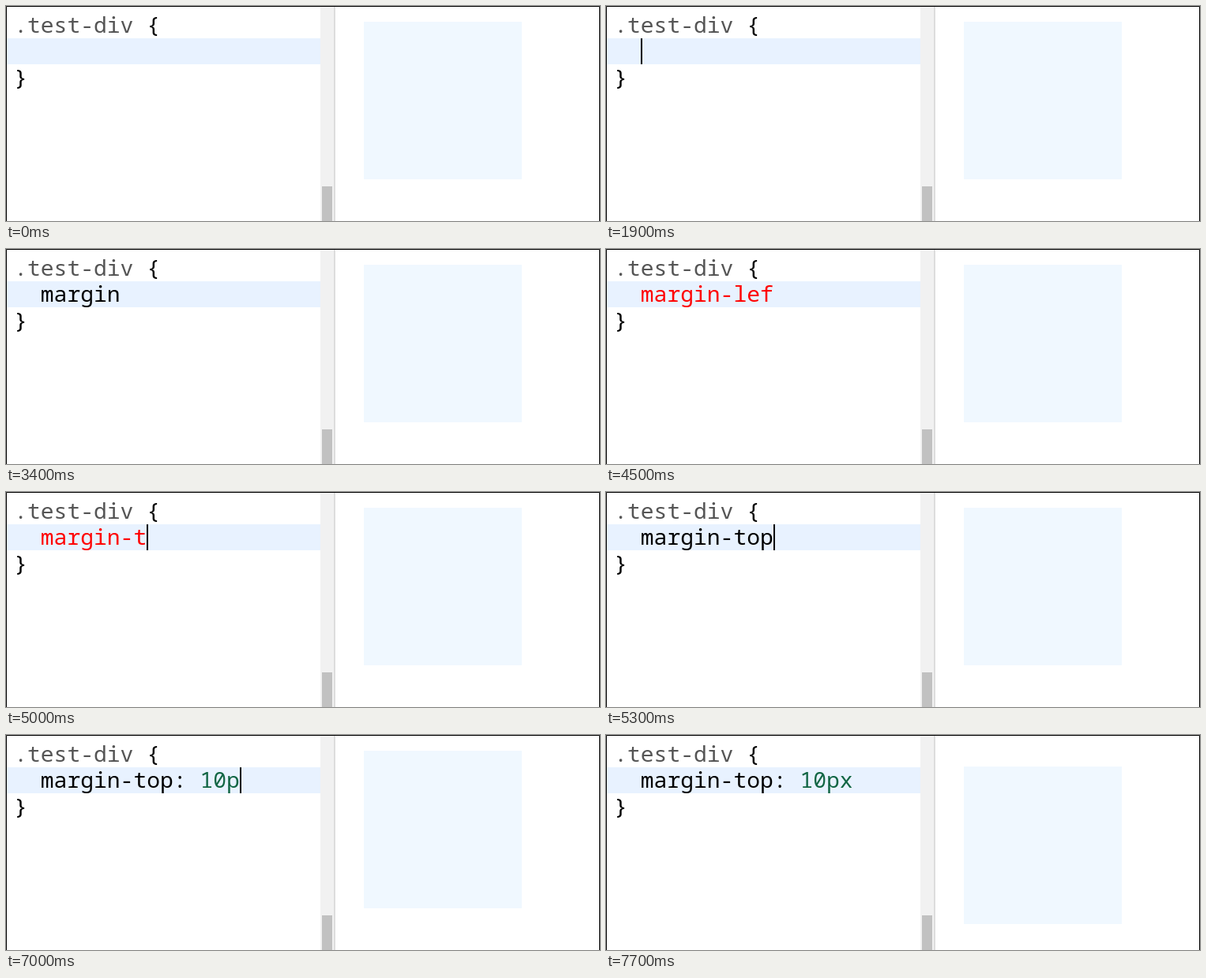
These frames come from a looping animation (752x273 px, 8000 ms). An HTML page:

```html
<!DOCTYPE html>
<html lang="en">
<head>
<meta charset="utf-8">
<title>Typing a CSS rule</title>
<style>
  html, body { margin: 0; width: 100%; height: 100%; overflow: hidden; background: #fff; }
  svg { display: block; width: 752px; height: 273px; }
  text { white-space: pre; font-kerning: none; font-variant-ligatures: none; }
  .selector { fill: #555; }
  .error { fill: #f00; }
  .value { fill: #164; }
</style>
</head>
<body>
<svg viewBox="0 0 752 273">
  <rect width="752" height="273" fill="#fff"/>
  <rect x="1" y="41" width="397" height="33" fill="#e8f2ff"/>
  <rect x="398" width="17" height="273" fill="#f1f1f1"/>
  <rect x="400" y="229" width="13" height="44" fill="#c1c1c1"/>
  <rect x="415" width="2" height="273" fill="#ddd"/>
  <rect id="box" x="453" y="20" width="200" height="200" fill="#f0f8ff"/>
  <g id="code">
    <text x="10.2" y="34"><tspan class="selector">.test-div</tspan> {</text>
    <text x="43.8" y="67"><tspan id="property"></tspan><tspan id="colon"></tspan><tspan id="value" class="value"></tspan></text>
    <text x="10.2" y="101">}</text>
  </g>
  <rect id="caret" y="41" width="2" height="33"/>
  <path d="M.5 273V.5H751.5V273" fill="none" stroke="#000"/>
</svg>
<script>
const LOOP = 8000, ADVANCE = 16.8, INDENT = 43.8, X_HEIGHT = 13.6;
const VALID = ['', 'margin', 'margin-top'];
const $ = id => document.getElementById(id);

// [start in ms, typed text, caret visible]
const steps = [
  [0, '', false], [900, '', true], [1400, '', false], [1900, '', true],
  [2000, 'm', true], [2100, 'ma', true], [2500, 'mar', true],
  [2700, 'marg', true], [2800, 'margi', true], [3000, 'margin', true],
  [3400, 'margin', false], [3500, 'margin-', true], [3700, 'margin-l', true],
  [3900, 'margin-le', true], [4000, 'margin-lef', true], [4500, 'margin-lef', false],
  [4600, 'margin-le', true], [4700, 'margin-l', true], [4900, 'margin-', true],
  [5000, 'margin-t', true], [5100, 'margin-to', true], [5300, 'margin-top', true],
  [5800, 'margin-top', false], [5900, 'margin-top: ', true], [6400, 'margin-top: ', false],
  [6700, 'margin-top: 1', true], [6900, 'margin-top: 10', true],
  [7000, 'margin-top: 10p', true], [7200, 'margin-top: 10px', true],
  [7700, 'margin-top: 10px', false]
];

// Pick the installed monospace face with the closest proportions at this advance.
function chooseFont() {
  const ctx = document.createElement('canvas').getContext('2d');
  const faces = ['"Noto Sans Mono CJK JP"', '"Noto Sans Mono"'].map(name => {
    const family = name + ', monospace';
    ctx.font = '100px ' + family;
    const x = ctx.measureText('x');
    const size = 100 * ADVANCE / x.width;
    return { family, size, miss: Math.abs(x.actualBoundingBoxAscent * size / 100 - X_HEIGHT) };
  });
  return faces.sort((a, b) => a.miss - b.miss)[0];
}

function render(time) {
  const [, text, caretOn] = steps.findLast(([start]) => start <= time);
  const [name, value] = text.split(': ');
  $('property').textContent = name;
  $('property').setAttribute('class', VALID.includes(name) ? '' : 'error');
  $('colon').textContent = value === undefined ? '' : ': ';
  $('value').textContent = value || '';
  $('caret').setAttribute('x', Math.round(INDENT + text.length * ADVANCE));
  $('caret').setAttribute('visibility', caretOn ? 'visible' : 'hidden');
  $('box').setAttribute('y', value === '10px' ? 40 : 20);
}

const font = chooseFont();
$('code').style.fontFamily = font.family;
$('code').style.fontSize = font.size + 'px';

const begin = performance.now();
function tick() {
  render((performance.now() - begin) % LOOP);
  requestAnimationFrame(tick);
}
tick();
</script>
</body>
</html>
```
